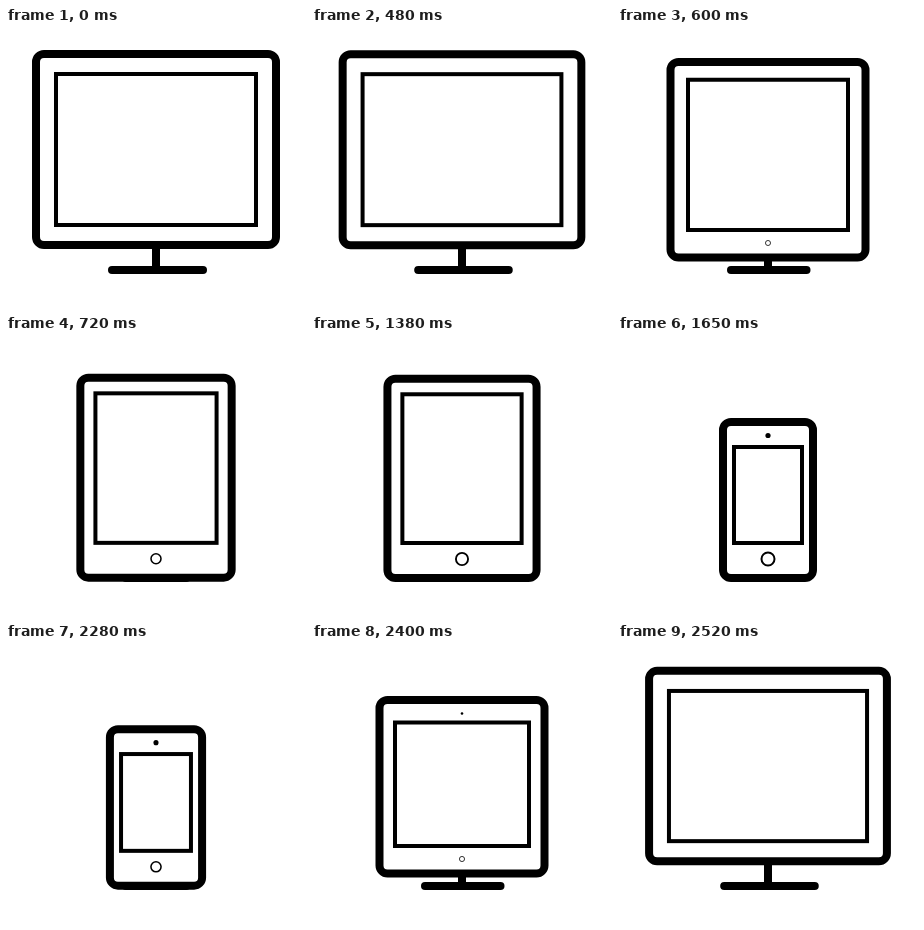
Animation of 300 by 280 pixels, one loop 2.55 s. Source, as an HTML page:

```html
<!DOCTYPE html>
<html lang="en">
<head>
<meta charset="utf-8">
<title>Responsive devices</title>
<style>
  html, body { margin: 0; width: 100%; height: 100%; overflow: hidden; background: #fff; }
  svg { display: block; width: 100%; height: 100%; }
</style>
</head>
<body>
<svg viewBox="0 0 300 280" fill="#fff" stroke="#000" stroke-width="8">
  <path id="stand" stroke-linecap="round"/>
  <path d="M150 217V242"/>
  <rect id="body" rx="8"/>
  <rect id="screen" stroke-width="4"/>
  <circle id="home" cx="150"/>
  <circle id="camera" cx="150" fill="#000" stroke="none"/>
</svg>
<script>
const LOOP = 2550, STEP = 30, MOVE = 300;

// Boxes are left, top, right, bottom along the middle of the stroke.
const desktop = { body: [30, 26, 270, 217], screen: [50, 46, 250, 197], stand: [106, 197], home: [207, 0], camera: 0 };
const tablet = { body: [75, 42, 225, 242], screen: [90, 57.5, 210, 207], stand: [120, 180], home: [223, 1], camera: 0 };
const phone = { body: [105, 86, 195, 242], screen: [116, 111, 184, 207], stand: [120, 180], home: [223, 1], camera: 2.6 };

const moves = [
  { start: 450, from: desktop, to: tablet },
  { start: 1350, from: tablet, to: phone },
  { start: 2250, from: phone, to: desktop }
];

const el = id => document.getElementById(id);
const clamp = x => Math.min(1, Math.max(0, x));
const ease = p => p < 0.5 ? Math.pow(2 * p, 2.2) / 2 : 1 - Math.pow(2 - 2 * p, 2.2) / 2;
const mix = (a, b, p) => Array.isArray(a) ? a.map((v, i) => mix(v, b[i], p)) : a + (b - a) * p;

function set(id, attrs) {
  for (const name in attrs) el(id).setAttribute(name, attrs[name]);
}

function setBox(id, [left, top, right, bottom]) {
  set(id, { x: left, y: top, width: right - left, height: bottom - top });
}

// The home button swells slowly until the phone has settled.
function swell(t) {
  return t > 2250 ? 0.79 : 0.78 + 0.22 * clamp((t - 750) / 900);
}

function draw(t) {
  const move = moves.filter(m => t >= m.start).pop() || moves[0];
  const p = ease(clamp((t - move.start) / MOVE));
  const part = name => mix(move.from[name], move.to[name], p);

  const body = part('body');
  const [left, right] = part('stand');
  const [homeY, shown] = part('home');
  const size = shown * swell(t);

  setBox('body', body);
  setBox('screen', part('screen'));
  set('stand', { d: `M${left} 242H${right}` });
  set('home', { cy: homeY, r: 6.5 * size, 'stroke-width': 2 * size });
  set('camera', { cy: body[1] + 13.5, r: part('camera') });
}

const begin = performance.now();
function tick() {
  const t = (performance.now() - begin) % LOOP;
  draw(Math.floor(t / STEP) * STEP);
  requestAnimationFrame(tick);
}
tick();
</script>
</body>
</html>
```
